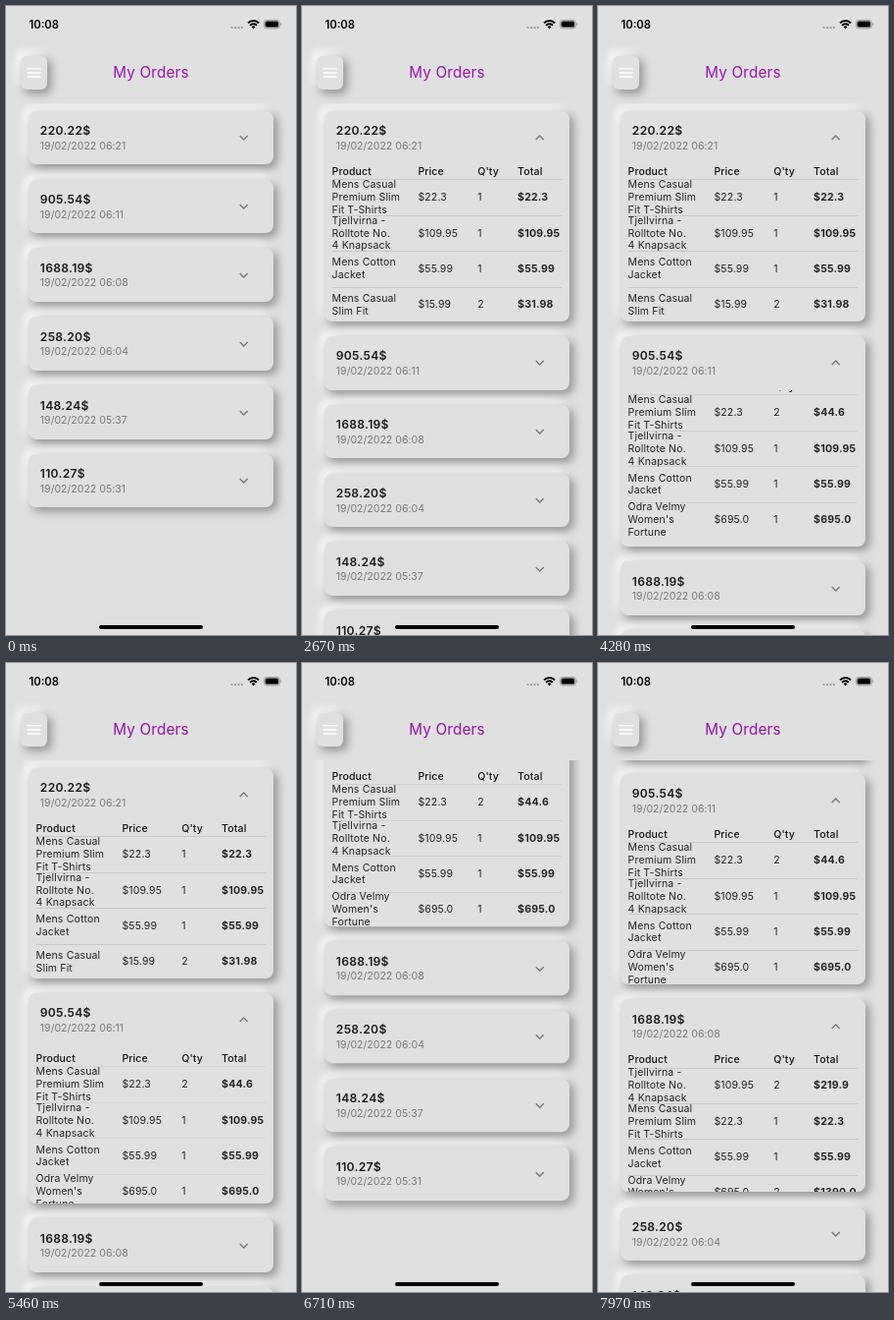
Animation, 296 px wide and 640 px high, one loop 8030 ms. Source, as an HTML page:

```html
<!DOCTYPE html>
<html lang="en">
<head>
<meta charset="utf-8">
<title>My Orders</title>
<style>
  html, body { margin: 0; width: 100%; height: 100%; overflow: hidden; background: #e0e0e0; }
  body { position: relative; font: 400 10.5px/12.9px Inter, "Open Sans", sans-serif; color: #222; }
  .status, .menu, h1, .list, .home { position: absolute; }
  .raised {
    background: #e0e0e0;
    box-shadow: 3.6px 3.6px 10px .7px #929292, -3.6px -3.6px 10px .7px #fff;
  }
  .status { left: 0; top: 0; width: 296px; height: 40px; }
  .status text { font: 600 11.3px Inter, sans-serif; }
  .menu { left: 15px; top: 51px; width: 27px; height: 34px; border-radius: 6px; }
  h1 {
    left: 0; top: 58px; width: 296px; margin: 0; text-align: center;
    font-size: 15.2px; font-weight: 400; line-height: 20px; letter-spacing: .2px; color: #9614ac;
  }
  .list { left: 0; top: 99px; width: 296px; height: 541px; overflow: hidden; }
  .cards { padding-top: 7.9px; }
  .card {
    position: relative; width: 250.3px; margin: 0 0 15.2px 22.8px;
    border-radius: 8px; overflow: hidden;
  }
  .head { position: relative; height: 54.6px; }
  .sum, .date { position: absolute; left: 12px; white-space: nowrap; }
  .sum { top: 12.5px; font-size: 12.1px; line-height: 16px; font-weight: 600; letter-spacing: .3px; color: #1a1a1a; }
  .date { top: 29px; font-size: 10.5px; line-height: 14px; letter-spacing: .03px; color: #777; }
  .chevron { position: absolute; left: 214px; top: 21.5px; }
  .body { height: 0; overflow: hidden; }
  .row {
    position: relative; height: 36.4px; margin: 0 8px 0 7.8px;
    box-shadow: 0 -.8px #c3c3c3; clip-path: inset(-2px 0 0); letter-spacing: .15px;
  }
  .row.title { height: 15.9px; box-shadow: none; font-weight: 500; color: #111; }
  .row span {
    position: absolute; top: 0; bottom: 0; display: flex; align-items: center; white-space: pre;
  }
  .row span:nth-child(1) { left: 0; }
  .row span:nth-child(2) { left: 87.8px; }
  .row span:nth-child(3) { left: 148.6px; }
  .row span:nth-child(4) { left: 189.5px; }
  .row:not(.title) span:nth-child(4) { font-weight: 700; letter-spacing: .22px; }
  .home { left: 95.3px; top: 630.1px; width: 105.4px; height: 3.8px; border-radius: 2px; background: #000; }
</style>
</head>
<body>
<svg class="status" viewBox="0 0 296 40">
  <text x="23.5" y="22.7">10:08</text>
  <path d="M230.6 22h11" stroke="#999" stroke-width="2.2" stroke-linecap="round" stroke-dasharray="0 3.4"/>
  <path d="M247 17.4a7.6 7.6 0 0 1 11 0M249.1 19.8a4.7 4.7 0 0 1 6.8 0" fill="none" stroke="#000" stroke-width="2"/>
  <path d="M250.7 21.2a2.6 2.6 0 0 1 3.6 0L252.5 23.2z"/>
  <rect x="263.4" y="14.4" width="16" height="8.4" rx="2.5" fill="none" stroke="#888" stroke-width=".8"/>
  <rect x="264.6" y="15.6" width="13.6" height="6" rx="1.5"/>
  <path d="M280.4 17.2a1.6 1.6 0 0 1 0 2.8z" fill="#888"/>
</svg>
<div class="menu raised">
  <svg width="27" height="34"><path d="M6.5 12.7h14M6.5 16.9h14M6.5 21.1h14" stroke="#fff" stroke-width="1.5"/></svg>
</div>
<h1>My Orders</h1>
<div class="list"><div class="cards"></div></div>
<div class="home"></div>

<script>
const LOOP = 8030;
const TICK = 107;
const OPEN_TIME = 300;
const BODY_HEIGHT = 159.3;

const shirt = ['Mens Casual\nPremium Slim\nFit T-Shirts', 22.3];
const bag = ['Tjellvirna -\nRolltote No.\n4 Knapsack', 109.95];
const jacket = ['Mens Cotton\nJacket', 55.99];
const slim = ['Mens Casual\nSlim Fit', 15.99];
const bracelet = ['Odra Velmy\nWomen\'s\nFortune', 695];

const orders = [
  { sum: '220.22', time: '06:21', tap: 1267, items: [[shirt, 1], [bag, 1], [jacket, 1], [slim, 2]] },
  { sum: '905.54', time: '06:11', tap: 2720, items: [[shirt, 2], [bag, 1], [jacket, 1], [bracelet, 1]] },
  { sum: '1688.19', time: '06:08', tap: 7703, items: [[bag, 2], [shirt, 1], [jacket, 1], [bracelet, 2]] },
  { sum: '258.20', time: '06:04' },
  { sum: '148.24', time: '05:37' },
  { sum: '110.27', time: '05:31' },
];

// The screen refreshes only within these spans and stands still between them.
const bursts = [
  [1300, 1520], [2670, 2970], [3570, 3790], [3930, 4500], [4810, 5030],
  [5250, 5780], [5920, 5920], [6150, 6920], [7020, 7440], [7660, 7970],
];
// Turning points of the finger drags and their rebounds: [time, offset].
const tableDrag = [[3540, 0], [4040, 11.5], [4500, 8], [5350, -6], [5920, 0]];
const pageDrag = [[6100, 0], [6740, 285], [7500, 223]];

const clamp = x => Math.min(1, Math.max(0, x));
const smooth = x => x * x * (3 - 2 * x);

function lastRefresh(t) {
  const burst = bursts.findLast(([from]) => from <= t);
  if (!burst) return 0;
  const [from, to] = burst;
  const steps = Math.round((to - from) / TICK);
  const step = (to - from) / steps || 0;
  return step ? from + Math.min(steps, Math.floor((t - from) / step + .05)) * step : from;
}

// Sums one eased move per pair of turning points.
const offsetAt = (keys, t) => keys.slice(1).reduce((sum, [end, value], i) => {
  const [begin, before] = keys[i];
  return sum + (value - before) * smooth(clamp((t - begin) / (end - begin)));
}, 0);

const price = n => '$' + (Number.isInteger(n) ? n.toFixed(1) : +n.toFixed(2));
const row = (cells, kind = '') =>
  `<div class="row ${kind}">${cells.map(c => `<span>${c}</span>`).join('')}</div>`;
const itemRow = ([[name, cost], count]) => row([name, price(cost), count, price(cost * count)]);

const list = document.querySelector('.cards');
list.innerHTML = orders.map(({ sum, time, items = [] }) => `
  <div class="card raised">
    <div class="head">
      <div class="sum">${sum}$</div>
      <div class="date">19/02/2022 ${time}</div>
      <svg class="chevron" width="12" height="12"><path fill="none" stroke="#777" stroke-width="1.4"/></svg>
    </div>
    <div class="body"><div class="table">
      ${row(['Product', 'Price', 'Q\'ty', 'Total'], 'title')}${items.map(itemRow).join('')}
    </div></div>
  </div>`).join('');

const cards = [...list.children].map((card, i) => ({
  tap: orders[i].tap ?? Infinity,
  body: card.querySelector('.body'),
  table: card.querySelector('.table'),
  chevron: card.querySelector('.chevron path'),
}));

const shift = (el, y) => { el.style.transform = y ? `translateY(${-y}px)` : 'none'; };

function draw(time) {
  const t = lastRefresh(time);
  for (const { tap, body, chevron } of cards) {
    const open = clamp((t - tap) / OPEN_TIME);
    body.style.height = open * BODY_HEIGHT + 'px';
    chevron.setAttribute('d', open ? 'M1.7 8l4-4 4 4' : 'M1.7 4l4 4 4-4');
  }
  shift(cards[1].table, offsetAt(tableDrag, t));
  shift(list, offsetAt(pageDrag, t));
}

const start = performance.now();
function tick() {
  draw((performance.now() - start) % LOOP);
  requestAnimationFrame(tick);
}
tick();
</script>
</body>
</html>
```
